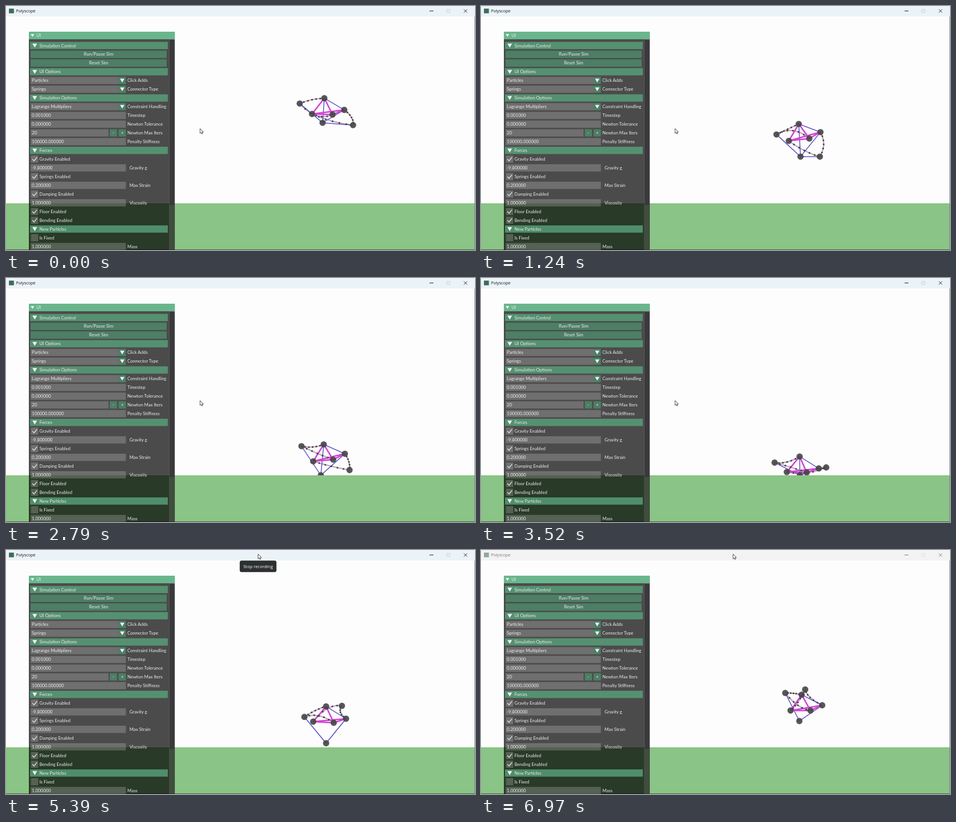
Animation of 800 by 418 pixels, one loop 7 s. Source, as an HTML page:

```html
<!DOCTYPE html>
<html lang="en">
<head>
<meta charset="utf-8">
<title>Polyscope</title>
<style>
html, body { margin: 0; width: 100%; height: 100%; overflow: hidden; background: #fefdfe; }
svg { display: block; width: 100vw; height: 100vh; }
text { font: 7.6px Lato, sans-serif; fill: #ececec; white-space: pre; }
text.system { font-family: "Open Sans", "Noto Sans", sans-serif; }
</style>
</head>
<body>
<svg id="stage" viewBox="0 0 800 418"></svg>
<script>
const LOOP = 7000;
const FLOOR = 338;
const NS = "http://www.w3.org/2000/svg";
const stage = document.getElementById("stage");

function add(tag, attrs, parent = stage) {
  const el = document.createElementNS(NS, tag);
  set(el, attrs);
  parent.appendChild(el);
  return el;
}
function set(el, attrs) {
  for (const key in attrs) el.setAttribute(key, attrs[key]);
}
const group = () => add("g", {});
const rect = (x, y, width, height, fill, parent) => add("rect", { x, y, width, height, fill }, parent);
const path = (d, attrs, parent) => add("path", { d, fill: "none", ...attrs }, parent);
function label(x, y, string, attrs = {}, parent = stage) {
  const el = add("text", { x, y, ...attrs }, parent);
  el.textContent = string;
  return el;
}

// Key poses of the soft body
const TIMES = [0, 1240, 1850, 2790, 4270, 5390, 6970];
const CORE_VY = [.024, .042, .055, .05, -.033, -.019, -.006];
const NODES = {
  A: { x: [501, 504, 511, 504, 500, 509, 519], y: [167, 220, 248, 288, 332, 286, 245] },
  B: { x: [543, 542, 541, 542, 545, 546, 547], y: [158, 202, 231, 285, 296, 268, 248], vy: CORE_VY },
  C: { x: [577, 579, 578, 578, 575, 580, 582], y: [178, 216, 245, 301, 321, 289, 266], vy: CORE_VY },
  D: { x: [522, 525, 525, 524, 520, 524, 528], y: [185, 231, 261, 314, 320, 294, 275], vy: CORE_VY },
  E: { x: [557, 560, 559, 558, 554, 559, 562], y: [186, 227, 256, 311, 325, 296, 275], vy: CORE_VY },
  F: { x: [540, 545, 541, 537, 551, 546, 543], y: [200, 258, 285, 338, 331, 331, 293] },
  G: { x: [592, 578, 576, 586, 588, 573, 553], y: [204, 258, 282, 329, 307, 267, 239] }
};
const SPRINGS = [
  { ends: "BC" }, { ends: "AF" }, { ends: "CF" },
  { ends: "BF", snaps: 4600 }, { ends: "FG", snaps: 2400 }
];
const STIFF = ["BD", "BE", "DE", "DC", "EC"];
const RODS = [
  { ends: "AB", axis: "y", bulge: [-2, 0, 0, 3, 4, -2, -1] },
  { ends: "AE", axis: "y", bulge: [11, -10, -7, 1, -4, -7, 6] },
  { ends: "GC", axis: "x", bulge: [5, 6, -6, 3, 1, -6, -6] },
  { ends: "GD", axis: "y", bulge: [3, 3, -3, 1, 7, -9, 4] }
];
const BEADS = 5;

function slope(values, i) {
  const a = Math.max(0, i - 1), b = Math.min(values.length - 1, i + 1);
  return (values[b] - values[a]) / (TIMES[b] - TIMES[a]);
}

// Cubic Hermite through the key values
function sample(values, t, speeds) {
  let i = 0;
  while (i < TIMES.length - 2 && t >= TIMES[i + 1]) i++;
  const span = TIMES[i + 1] - TIMES[i];
  const u = (t - TIMES[i]) / span;
  const v0 = speeds ? speeds[i] : slope(values, i);
  const v1 = speeds ? speeds[i + 1] : slope(values, i + 1);
  const u2 = u * u, u3 = u2 * u;
  return values[i] * (2 * u3 - 3 * u2 + 1) + values[i + 1] * (3 * u2 - 2 * u3)
    + span * (v0 * (u3 - 2 * u2 + u) + v1 * (u3 - u2));
}

// Scene
rect(0, 0, 800, 418, "#fefdfe");
const body = group();
for (const rod of RODS) {
  rod.el = path("", { stroke: "#bda9b9", "stroke-width": 2.2 }, body);
}
for (const spring of SPRINGS) {
  spring.el = add("line", { stroke: "#4a42bd", "stroke-width": 1.3 }, body);
}
const stiffLines = STIFF.map(ends => ({
  ends, el: add("line", { stroke: "#d243d4", "stroke-width": 2.5 }, body)
}));
for (const rod of RODS) {
  rod.beads = Array.from({ length: BEADS }, () => add("circle", { r: 1.5, fill: "#45404a" }, body));
}
const balls = {};
for (const name in NODES) {
  balls[name] = add("circle", { r: 5.4, fill: "#454446", "fill-opacity": .9 }, body);
}
rect(0, FLOOR, 800, 80, "#8ac486");
rect(0, 417, 800, 1, "#4b6650");
rect(799.2, 18, .8, 400, "#75828a");

// Window bar
const bar = rect(0, 0, 800, 18, "#ebf3f9");
const barItems = group();
rect(5, 4.5, 8.5, 8, "#3f6b58", barItems);
label(17, 11.3, "Polyscope", { class: "system", style: "font-size:7.1px;fill:#191919" }, barItems);
path("M722.5 8.5h6.5", { stroke: "#222" }, barItems);
path("M752 6h5v5h-5z", { stroke: "#c3c8cb", "stroke-width": .8 }, barItems);
path("M781 5.8l5.6 5.6m0-5.6l-5.6 5.6", { stroke: "#222", "stroke-width": .9 }, barItems);

// Panel
const HEADER = "rgba(88,163,123,.8)";
const BUTTON = "rgba(78,140,108,.8)";
const FIELD = "rgba(255,255,255,.2)";
rect(39, 44, 249, 374, "rgba(0,0,0,.7)");
rect(39, 44, 249, 13, "#69b68c");
rect(278, 57, 10, 361, "rgba(130,130,130,.25)");
add("rect", { x: 279, y: 58, width: 8, height: 283, rx: 1, fill: "#3a393c" });
const triangle = (x, y, w) => path(`M${x} ${y - w * .4}h${w}l${-w / 2} ${w * .85}z`, { fill: "#f0f3f1" });
triangle(42.2, 50.3, 6);
label(52, 53.2, "UI");

const draw = {
  head(y, title) {
    rect(41, y - 6.2, 235, 12.4, HEADER);
    triangle(45, y, 8);
    label(57, y + 2.8, title);
  },
  button(y, title) {
    rect(42, y - 6.2, 232, 12.6, BUTTON);
    label(158, y + 2.8, title, { "text-anchor": "middle" });
  },
  field(y, value, name, x = 207) {
    rect(42, y - 6.2, 162.5, 12.4, FIELD);
    label(44, y + 2.8, value);
    label(x, y + 2.8, name);
  },
  wide(y, value, name) { draw.field(y, value, name, 210.7); },
  combo(y, value, name) {
    rect(42, y - 6.2, 150, 12.4, FIELD);
    rect(192, y - 6.2, 12.5, 12.4, BUTTON);
    triangle(194.5, y, 7.5);
    label(44, y + 2.8, value);
    label(207, y + 2.8, name);
  },
  stepper(y, value, name) {
    rect(42, y - 6.2, 133, 12.4, FIELD);
    for (const [x, sign] of [[177, "-"], [192, "+"]]) {
      rect(x, y - 6.2, 12.5, 12.4, BUTTON);
      label(x + 6.2, y + 2.6, sign, { "text-anchor": "middle" });
    }
    label(44, y + 2.8, value);
    label(207, y + 2.8, name);
  },
  check(y, name, on = true) {
    rect(42.5, y - 6.2, 12.5, 12.4, FIELD);
    if (on) path(`M45 ${y}l2.8 3 5-6`, { stroke: "#d2d4d3", "stroke-width": 1.5 });
    label(57, y + 2.8, name);
  }
};
[
  ["head", "Simulation Control"],
  ["button", "Run/Pause Sim"],
  ["button", "Reset Sim"],
  ["head", "UI Options"],
  ["combo", "Particles", "Click Adds"],
  ["combo", "Springs", "Connector Type"],
  ["head", "Simulation Options"],
  ["combo", "Lagrange Multipliers", "Constraint Handling"],
  ["field", "0.001000", "Timestep"],
  ["field", "0.000000", "Newton Tolerance"],
  ["stepper", "20", "Newton Max Iters"],
  ["field", "100000.000000", "Penalty Stiffness"],
  ["head", "Forces"],
  ["check", "Gravity Enabled"],
  ["wide", "-9.800000", "Gravity g"],
  ["check", "Springs Enabled"],
  ["wide", "0.200000", "Max Strain"],
  ["check", "Damping Enabled"],
  ["wide", "1.000000", "Viscosity"],
  ["check", "Floor Enabled"],
  ["check", "Bending Enabled"],
  ["head", "New Particles"],
  ["check", "Is Fixed", false],
  ["field", "1.000000", "Mass"]
].forEach(([kind, ...args], i) => draw[kind](67.7 + i * 14.97, ...args));

// Tooltip and pointer
const tooltip = group();
add("rect", { x: 399, y: 18.5, width: 62, height: 19, rx: 2.5, fill: "#2d3031", stroke: "#1f2122", "stroke-width": .6 }, tooltip);
label(430, 30.6, "Stop recording", { class: "system", "text-anchor": "middle", style: "font-size:7.4px;fill:#fff" }, tooltip);
const pointer = path("M0 0V8.2L1.9 6.5 3.1 9.2 4.4 8.6 3.2 6H5.8Z", { fill: "#fff", stroke: "#111", "stroke-width": .7 });

function ease(t, from, to) {
  const u = Math.min(1, Math.max(0, (t - from) / (to - from)));
  return u * u * (3 - 2 * u);
}
function placeLine(el, [a, b], points) {
  const p = points[a], q = points[b];
  set(el, { x1: p.x, y1: p.y, x2: q.x, y2: q.y });
}

function render(t) {
  const points = {};
  for (const name in NODES) {
    const { x, y, vy } = NODES[name];
    const p = points[name] = { x: sample(x, t), y: Math.min(FLOOR, sample(y, t, vy)) };
    set(balls[name], { cx: p.x, cy: p.y });
  }
  for (const { el, ends, snaps = LOOP } of SPRINGS) {
    placeLine(el, ends, points);
    set(el, { visibility: t < snaps ? "visible" : "hidden" });
  }
  for (const { el, ends } of stiffLines) placeLine(el, ends, points);
  for (const { el, ends, axis, bulge, beads } of RODS) {
    const p = points[ends[0]], q = points[ends[1]];
    const mid = { x: (p.x + q.x) / 2, y: (p.y + q.y) / 2 };
    mid[axis] += 2 * sample(bulge, t);
    set(el, { d: `M${p.x} ${p.y}Q${mid.x} ${mid.y} ${q.x} ${q.y}` });
    beads.forEach((bead, i) => {
      const u = (i + 1) / (BEADS + 1), v = 1 - u;
      const at = k => v * v * p[k] + 2 * u * v * mid[k] + u * u * q[k];
      set(bead, { cx: at("x"), cy: at("y") });
    });
  }

  const up = ease(t, 3680, 4150);
  const px = 331 + 119.5 * up - 20.5 * ease(t, 4420, 4800);
  set(pointer, { transform: `translate(${px} ${210 - 203 * up})` });
  set(tooltip, { visibility: t >= 5130 && t < 6640 ? "visible" : "hidden" });
  const inactive = t >= 6700;
  set(bar, { fill: inactive ? "#f3f3f3" : "#ebf3f9" });
  set(barItems, { opacity: inactive ? .55 : 1 });
}

const start = performance.now();
function tick() {
  render((performance.now() - start) % LOOP);
  requestAnimationFrame(tick);
}
tick();
</script>
</body>
</html>
```
